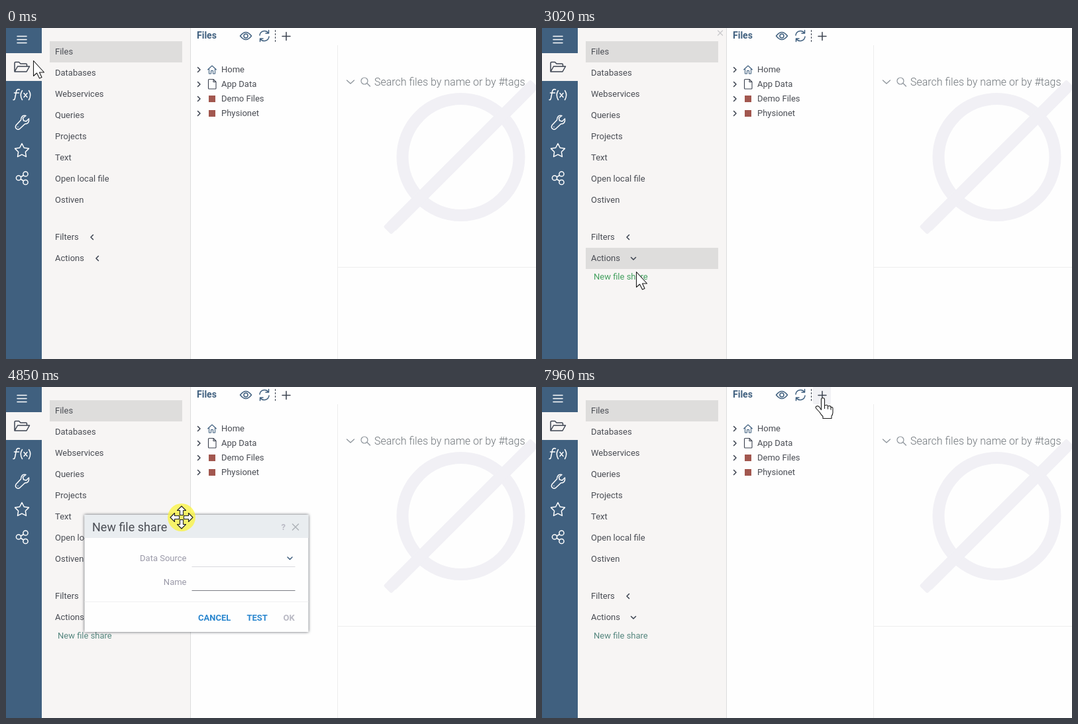
These frames come from a looping animation (800 px wide and 500 px high, 8000 ms). An HTML page:

```html
<!DOCTYPE html>
<html lang="en">
<head>
<meta charset="utf-8">
<title>New file share</title>
<style>
  html, body { margin: 0; width: 100%; height: 100%; overflow: hidden; background: #fefefe; }
  svg { display: block; width: 800px; height: 500px; font: 13px Roboto, sans-serif; }
  text { fill: #4a4d54; white-space: pre; }
  .line { fill: none; stroke-width: 1.5; stroke-linecap: round; stroke-linejoin: round; }
  .white { stroke: #fff; }
  .navy { stroke: #40607f; }
  .dark { stroke: #3c4350; }
  .pale { stroke: #c9c9cc; stroke-width: 1.2; }
  .title { font-size: 18px; }
  .bold { font-weight: 700; }
  .label { fill: #9a99a8; text-anchor: end; }
  .action { fill: #2b87cf; font-weight: 700; }
  .off { fill: #b9b9c4; font-weight: 700; }
  .cursor { fill: #fff; stroke: #1c1c1c; stroke-width: 1.1; stroke-linejoin: round; }
</style>
</head>
<body>
<svg id="stage" viewBox="0 0 800 500"></svg>
<script>
const text = (x, y, str, cls = '') => `<text x="${x}" y="${y}" class="${cls}">${str}</text>`;
const line = (d, cls, extra = '') => `<path class="line ${cls}" d="${d}" ${extra}/>`;
const rect = (x, y, w, h, fill, extra = '') =>
  `<rect x="${x}" y="${y}" width="${w}" height="${h}" fill="${fill}" ${extra}/>`;
const cross = (x, y, r, cls, id = '') =>
  line(`M${x - r} ${y - r}l${2 * r} ${2 * r}m0 ${-2 * r}l${-2 * r} ${2 * r}`, cls, id && `id="${id}"`);

const menu = ['Files', 'Databases', 'Webservices', 'Queries', 'Projects', 'Text', 'Open local file', 'Ostiven'];
const tree = ['Home', 'App Data', 'Demo Files', 'Physionet'];

const starPoints = Array.from({ length: 10 }, (_, i) => {
  const r = i % 2 ? 5.6 : 11, a = Math.PI * i / 5;
  return `${24 + r * Math.sin(a)} ${185.5 - r * Math.cos(a)}`;
}).join('L');

const sidebar = rect(0, 0, 54, 500, '#40607f') + rect(0, 38, 54, 42, '#f7f5f4') +
  line('M17 12.5h14M17 17.5h14M17 22.5h14', 'white') +
  line('M13 65.500V53q0-1.500 1.500-1.500h5l2.500 2.500h8q1.500 0 1.500 1.500v2.500M13 66l4.500-8h18l-4.500 8z', 'dark') +
  line('M20.500 93q-4-1.500-5 3l-2 10q-.7 3-2.500 2.500M12.500 98h7M24.500 94.500q-4.500 6.500 0 14M27 98.500l5 6m0-6l-5 6M34.500 94.500q4.500 6.500 0 14', 'white') +
  line('M30 132.500q-7-1.500-7.500 6.500l-7.500 8q-1.500 3 .5 5t5 .5l8-7.500q7 0 6-8l-4 4-4-1-1-4zM18 149.500v.1', 'white') +
  line(`M${starPoints}z`, 'white') +
  line('M22.500 225l4-2.500M22.500 228.500l4 2.500', 'white') +
  [[19, 226.5], [29.5, 220.5], [29.5, 233]].map(([x, y]) =>
    `<circle class="line white" cx="${x}" cy="${y}" r="3.6"/>`).join('');

const panel = rect(54, 0, 224, 500, '#f7f5f4') + rect(278, 0, 1, 500, '#dcdcdc') +
  rect(66, 20, 200, 32, '#dedddc') + rect(66, 0, 200, 32, '#dedddc', 'id="hover"') +
  menu.map((name, i) => text(74, 40 + 32 * i, name)).join('') +
  text(74, 320, 'Filters') + line('M131.500 312.500l-3.500 3.500 3.500 3.500', 'dark') +
  text(74, 352, 'Actions') +
  line('M139.500 344.500l-3.500 3.500 3.500 3.500', 'dark', 'id="closed"') +
  line('M134.500 346.500l3.500 3.500 3.500-3.500', 'dark', 'id="open"') +
  '<text id="link" x="78" y="380">New file share</text>' +
  cross(269, 7.5, 3.5, 'pale', 'panelClose');

const files = text(288, 16, 'Files', 'bold" style="font-size:14px;fill:#40607f') +
  rect(409, -2, 27, 28, '#f1f1f4', 'id="plusHover" rx="2"') +
  line('M353.500 12q8.500-11 17 0q-8.500 11-17 0z', 'navy') +
  '<circle class="line navy" cx="362" cy="12" r="3"/>' +
  line('M383 11a7.200 7.200 0 0 1 13-3.500m.5-4v4.500h-4.500M397 13a7.200 7.200 0 0 1-13 3.500m-.5 4v-4.500h4.500', 'navy') +
  line('M406.500 3v18', 'dark', 'stroke-dasharray="3 2" style="stroke-width:1;stroke-linecap:butt"') +
  line('M417 12.500h12M423 6.500v12', 'dark') +
  tree.map((name, i) => line(`M289.500 ${59.500 + 22 * i}l3.500 3.500-3.500 3.500`, 'dark') +
    text(325, 67 + 22 * i, name)).join('') +
  line('M304.500 63l6.500-6 6.500 6M306.500 62v7h3v-4.500h3v4.500h3v-7', 'navy', 'style="stroke-width:1.1"') +
  line('M305.500 78.500q0-1 1-1h6.500l4 4v9.500q0 1-1 1h-9.500q-1 0-1-1zM313 77.500v4h4', 'dark', 'style="stroke-width:1.1"') +
  rect(306, 102, 10, 10, '#a2574f') + rect(306, 124, 10, 10, '#a2574f') +
  cross(486, 40, 4.5, 'pale', 'filesClose');

const preview = rect(500, 26, 1, 474, '#eeeeee') + rect(500, 361, 300, 1, '#eeeeee') +
  '<g fill="none" stroke="#f1f0f5" stroke-width="18"><circle cx="686.5" cy="195" r="88"/>' +
  '<path d="M582 300L792 90" stroke-linejoin="round"/></g>' +
  rect(-157, -8.5, 314, 17, '#f1f0f5', 'rx="3" transform="translate(686.5 195) rotate(-45)"') +
  line('M514.500 79l5.500 5 5.500-5', '', 'stroke="#8b9299" style="stroke-width:1.2"') +
  line('M545.500 84l4 4M546 80a5 5 0 1 1-10 0a5 5 0 1 1 10 0', '', 'stroke="#8b9299" style="stroke-width:1.2"') +
  text(556, 87, 'Search files by name or by #tags', '" style="font-size:16px;font-weight:300;fill:#6f757a');

const dialog = '<g id="dialog">' +
  rect(0, 0, 338, 177, '#fefefe', 'style="filter:drop-shadow(0 0 2px rgba(30,35,45,.75))"') +
  rect(0, 0, 338, 35, '#e9edf0') +
  text(11.5, 24.5, 'New file share', 'title') + text(297, 23, '?', 'off') +
  cross(318.5, 18.5, 4.5, '', 'dialogClose') +
  text(154, 70, 'Data Source', 'label') + text(154, 106, 'Name', 'label') +
  rect(162, 78, 156, 1, '#dadade') + rect(162, 114, 156, 1, '#7b7d84') +
  line('M306.500 64l3.500 3.500 3.500-3.500', 'navy') + rect(0, 131, 338, 1, '#f0f0f1') +
  text(171.5, 159.5, 'CANCEL', 'action') + text(245, 159.5, 'TEST', 'action') +
  text(300, 159.5, 'OK', 'off') + '</g>';

const arm = a => `<path transform="rotate(${a})" d="M0-17l6.500 6.500h-4v7h-5v-7h-4z"/>`;
const pointer = '<circle id="disc" r="21" fill="#fbf53c" fill-opacity=".75"/><g id="pointer" class="cursor">' +
  '<path id="arrow" d="M.5.5v23l5-4.500 4 8 3.500-1.500-3.500-7.500h7z"/>' +
  '<path id="hand" d="M-2.500 17.500V2q0-2.500 2.500-2.500t2.500 2.500v9q4.500-2 5 1q4-1.500 4.500 1.500q3-.5 3 2v6q0 3-2 5.500v3.500h-13v-3q-3-3-5-6.500l-5.500-6q-1-2 1-3t4 1zM2.500 11v5M7.500 12v4.500M12 13.500v4"/>' +
  `<g id="move">${[0, 90, 180, 270].map(arm).join('')}</g></g>`;

document.getElementById('stage').innerHTML = preview + files + panel + sidebar + dialog + pointer;
const el = id => document.getElementById(id);
el('dialogClose').setAttribute('stroke', '#aeb3b8');

// Bursts of movement: start, end, number of steps.
const bursts = [[970, 1250, 5], [1450, 2200, 11], [2270, 3020, 10], [3100, 3230, 2], [3490, 4240, 11],
  [4370, 5060, 11], [5260, 6010, 10], [7350, 7960, 10]];

// time, x, y, cursor shape from then on
const pointerPath = [[0, 41, 49, 'arrow'], [900, 41, 49, 'arrow'], [1250, 57, 8, 'arrow'], [1450, 60, 12, 'arrow'],
  [1525, 68, 21, 'hand'], [1675, 80, 34, 'hand'], [2125, 132, 308, 'hand'], [2200, 136, 327, 'hand'],
  [2430, 139, 344, 'hand'], [2770, 139, 344, 'hand'], [3020, 142, 368, 'arrow'], [3100, 144, 372, 'arrow'],
  [3230, 146, 377, 'hand'], [3715, 146, 377, 'arrow'], [4090, 275, 392, 'move'], [4240, 293, 395, 'move'],
  [4370, 293, 395, 'move'], [4439, 292, 390, 'move'], [4508, 290.5, 373, 'move'], [4853, 265, 197, 'move'],
  [4991, 262, 156, 'move'], [5060, 262, 152, 'move'], [5260, 262, 152, 'move'], [5920, 436, 163, 'hand'],
  [6010, 439, 162, 'hand'], [6490, 439, 162, 'arrow'], [7350, 439, 162, 'arrow'],
  [7880, 426, 23, 'hand'], [7960, 424, 17, 'hand'], [8000, 424, 17, 'hand']];
const dialogPath = [[0, 145, 390], [4370, 145, 390], [4439, 144, 385], [4508, 142.5, 368.5], [4853, 118.5, 193],
  [4991, 115, 147], [5060, 115, 143], [8000, 115, 143]];
const presses = [[2520, 2680], [3490, 3640], [4370, 5050], [6340, 6490]];

function stepped(t) {
  for (const [start, end, count] of bursts) {
    if (t < start || t >= end) continue;
    const gap = (end - start) / (count - 1);
    return start + gap * Math.min(count - 1, Math.floor((t - start) / gap + 0.25));
  }
  return t;
}

function along(path, t) {
  let i = path.length - 2;
  while (i > 0 && path[i][0] > t) i--;
  const [a, b] = [path[i], path[i + 1]];
  const k = (t - a[0]) / (b[0] - a[0]);
  return [a[1] + (b[1] - a[1]) * k, a[2] + (b[2] - a[2]) * k, a[3]];
}

function hoveredRow(t, y) {
  if (t < 1450 || t >= 3100) return null;
  if (y >= 332) return 332;
  if (y >= 300) return 300;
  return y >= 20 && y < 276 ? 20 + 32 * Math.floor((y - 20) / 32) : null;
}

const show = (id, on) => el(id).setAttribute('visibility', on ? 'visible' : 'hidden');
const place = (id, x, y) => el(id).setAttribute('transform', `translate(${x} ${y})`);

function draw(time) {
  const t = stepped(time);
  const [x, y, shape] = along(pointerPath, t);
  place('pointer', x, y);
  place('disc', x, y);
  for (const name of ['arrow', 'hand', 'move']) show(name, name === shape);
  show('disc', presses.some(([a, b]) => t >= a && t < b));

  const row = hoveredRow(t, y);
  show('hover', row !== null);
  if (row !== null) el('hover').setAttribute('y', row);

  const opened = t >= 2600;
  show('closed', !opened);
  show('open', opened);
  show('link', opened);
  el('link').style.fill = t < 3490 ? '#43a05f' : '#56877f';

  const [left, top] = along(dialogPath, t);
  place('dialog', left, top);
  el('dialog').style.display = t >= 3640 && t < 6490 ? '' : 'none';
  show('panelClose', t >= 1040 && t < 3715);
  show('filesClose', t >= 6490 && t < 7880);
  show('plusHover', t >= 7880);
}

let origin;
function tick(now) {
  origin ??= now;
  draw((now - origin) % 8000);
  requestAnimationFrame(tick);
}
draw(0);
requestAnimationFrame(tick);
</script>
</body>
</html>
```
